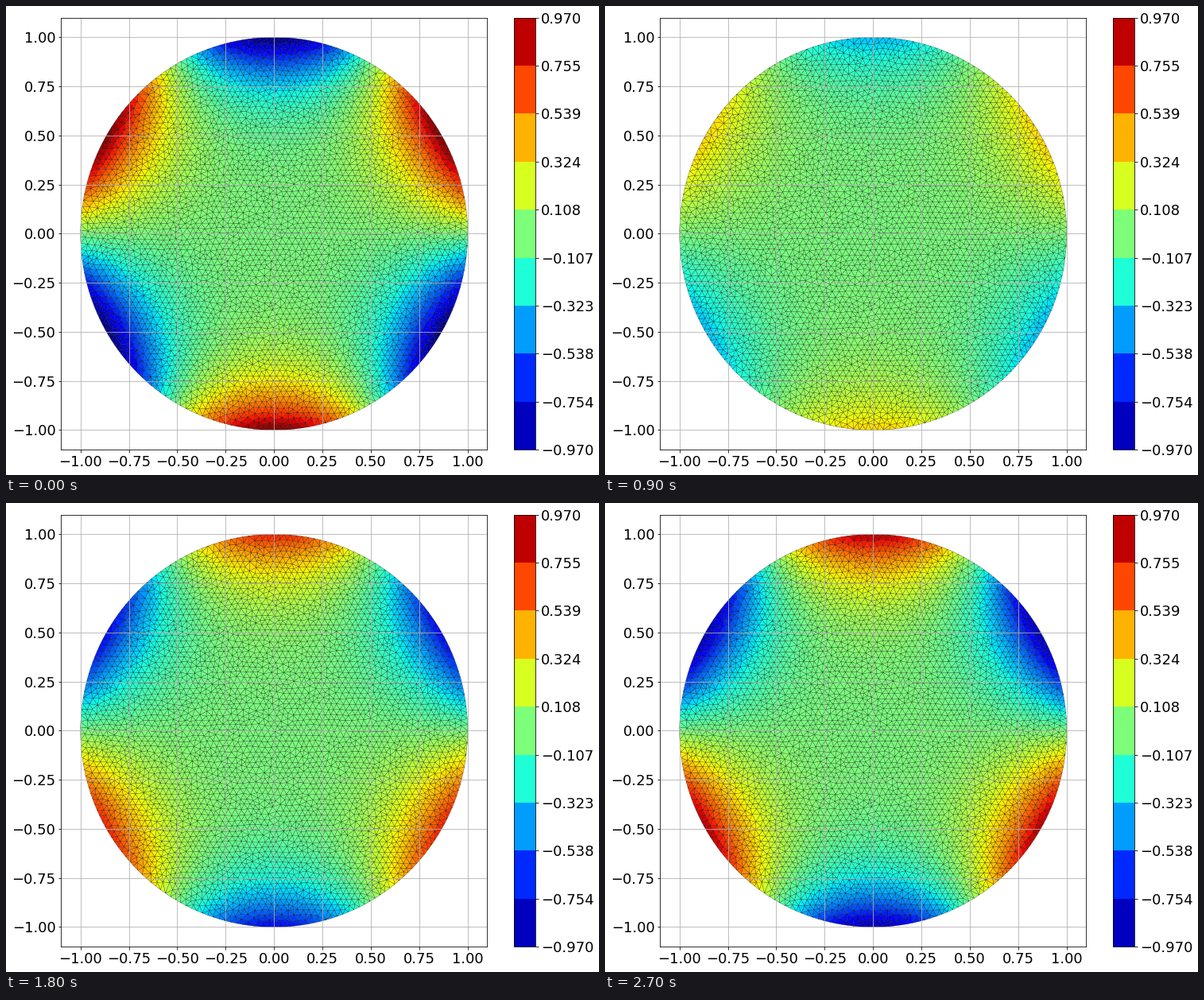
Write a matplotlib script that moves like this. It is 746 px wide and 590 px high and loops after 3000 ms.

```python
import matplotlib.pyplot as plt
import numpy as np
from matplotlib.animation import FuncAnimation
from matplotlib.ticker import MultipleLocator
from matplotlib.tri import Triangulation

WIDTH, HEIGHT, DPI = 746, 590, 72
FRAMES, INTERVAL = 10, 300
TIME_STEP = 0.4
SPACING = 0.031
V_MIN, V_MAX = -0.96955, 0.9704

plt.rcParams.update({"font.family": "DejaVu Sans", "font.size": 18})


def disk_mesh(h, smoothing=2):
    """Irregular triangle mesh of the unit disk with edges of about h."""
    rng = np.random.default_rng(7)
    count = round(2 * np.pi / h)
    angle = np.arange(count) * 2 * np.pi / count
    rim = np.column_stack([np.cos(angle), np.sin(angle)])

    row_step = h * np.sqrt(3) / 2
    n = int(1.2 / row_step)
    col, row = np.meshgrid(np.arange(-n, n + 1), np.arange(-n, n + 1))
    grid = np.column_stack([((col + 0.5 * (row % 2)) * h).ravel(),
                            (row * row_step).ravel()])
    grid += rng.uniform(-0.36, 0.36, grid.shape) * h
    inner = grid[np.hypot(*grid.T) < 1 - 0.6 * h]
    points = np.vstack([rim, inner])

    for _ in range(smoothing):
        a, b = Triangulation(*points.T).edges.T
        total = np.zeros_like(points)
        np.add.at(total, a, points[b])
        np.add.at(total, b, points[a])
        degree = np.bincount(np.concatenate([a, b]), minlength=len(points))
        mean = total / degree[:, None]
        points[count:] += 0.5 * (mean - points[:-0 or None])[count:]
    return Triangulation(*points.T)


def pixel_axes(left, bottom, width, height):
    return fig.add_axes([left / WIDTH, bottom / HEIGHT,
                         width / WIDTH, height / HEIGHT])


fig = plt.figure(figsize=(WIDTH / DPI, HEIGHT / DPI), dpi=DPI,
                 facecolor="white")
ax = pixel_axes(69.4, 31.8, 535.68, 543.6)
cax = pixel_axes(638.6, 31.8, 27.18, 543.6)

mesh = disk_mesh(SPACING)
radius, theta = np.hypot(mesh.x, mesh.y), np.arctan2(mesh.y, mesh.x)
mode = radius**4 * np.sin(3 * theta)
face_mode = mode[mesh.triangles].mean(axis=1)

surface = ax.tripcolor(mesh, facecolors=face_mode, cmap="jet",
                       vmin=V_MIN, vmax=V_MAX, edgecolors="k", linewidth=0.25)
ax.set(xlim=(-1.1, 1.1), ylim=(-1.1, 1.1))
for axis in (ax.xaxis, ax.yaxis):
    axis.set_major_locator(MultipleLocator(0.25))
ax.grid(True)

levels = np.linspace(V_MIN, V_MAX, 10)
bar = fig.colorbar(surface, cax=cax, boundaries=levels, ticks=levels)
bar.ax.set_yticklabels([f"{v:.3f}".replace("-", "\u2212") for v in levels])
bar.ax.minorticks_off()


def update(frame):
    surface.set_array(face_mode * np.cos(TIME_STEP * frame))
    return (surface,)


anim = FuncAnimation(fig, update, frames=FRAMES, interval=INTERVAL,
                     repeat=True, repeat_delay=0, blit=False)
plt.show()
```
